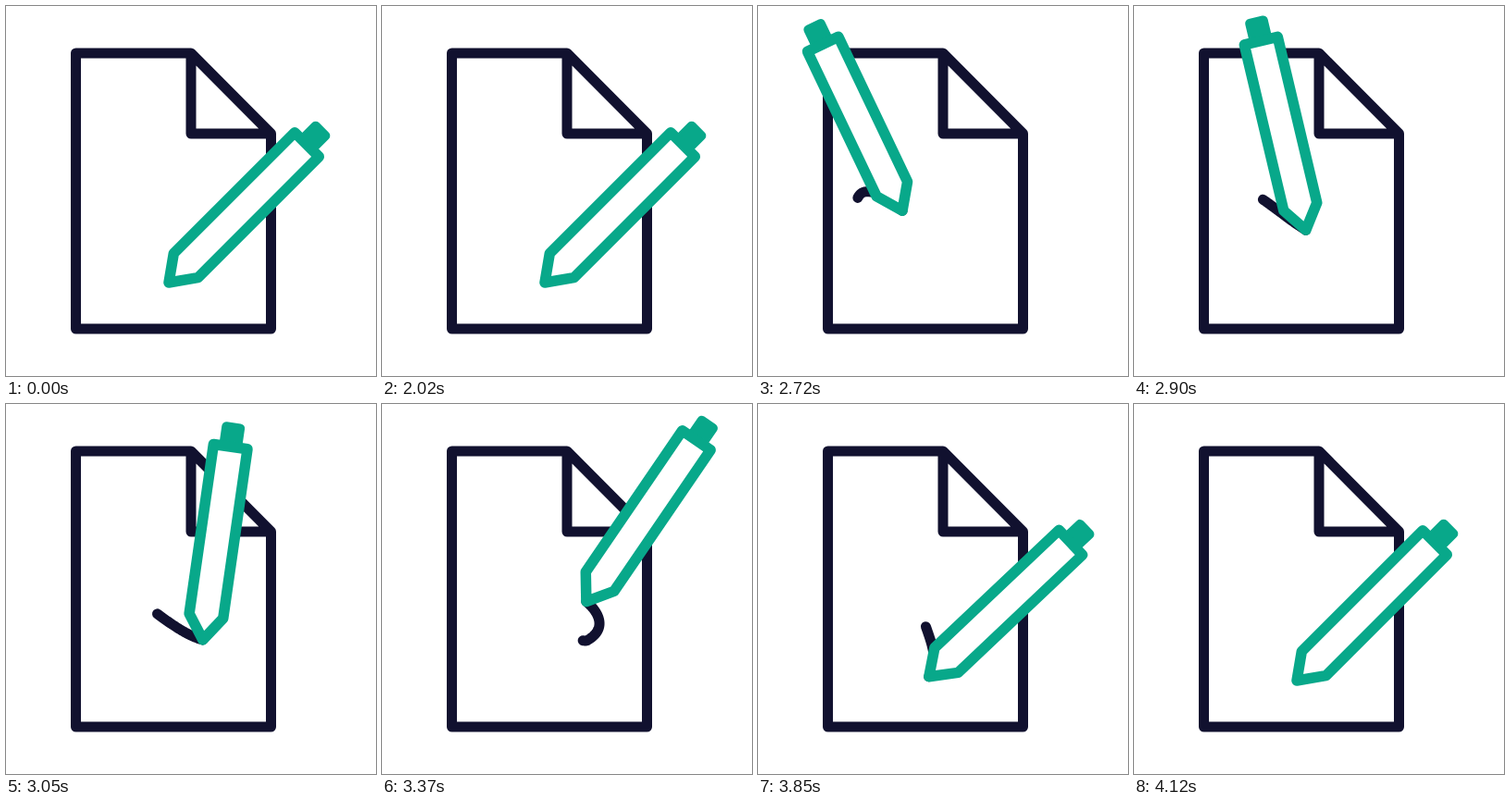
Recreate the animation shown at these times as an HTML page. Size 400x400 px, loop 4150 ms.

```html
<!DOCTYPE html>
<html lang="en">
<head>
<meta charset="utf-8">
<title>Signing a document</title>
<style>
  html, body { margin: 0; width: 100%; height: 100%; overflow: hidden; background: #fff; }
  svg { display: block; width: 100%; height: 100%; }
  path { stroke-width: 11; stroke-linecap: round; stroke-linejoin: round; fill: none; }
  .ink { stroke: #11112f; }
  #body { stroke: #08a88a; stroke-width: 11.5; fill: #fff; }
  #cap { fill: #08a88a; }
</style>
</head>
<body>
<svg viewBox="0 0 400 400">
  <path class="ink" d="M200 51H75.5V349H286.5V138H200V51L286.5 138"/>
  <path class="ink" id="trail"/>
  <g id="pen">
    <rect id="cap" x="-12.5" width="25" height="28" rx="5"/>
    <path id="body"/>
  </g>
</svg>
<script>
const LOOP = 4150, START = 2020, STEP = 25;
const INK_START = 2180, INK_LENGTH = 57, FADE_START = 3850, FADE_END = 4080;

const easeIn = power => s => s ** power;
const easeOut = power => s => 1 - (1 - s) ** power;
const linear = easeIn(1);

// Each stroke is a Bezier curve that continues from the end of the one before
const REST = { time: START, to: [176, 299], tilt: 45 };
const STROKES = [
  { time: 2550, via: [[114, 305], [76, 170]], to: [136, 207], move: easeIn(2.15),
    tilt: -28, swing: easeIn(1.34) },
  { time: 3095, via: [[158, 221], [196, 256]], to: [221, 256], move: easeIn(1.15),
    tilt: 18, swing: easeIn(2.5) },
  { time: 3600, via: [[260, 235], [210, 195]], to: [166, 190], move: linear,
    tilt: 48, swing: linear },
  { time: 4120, via: [[164, 215], [215, 290]], to: REST.to, move: easeOut(3.7),
    tilt: REST.tilt, swing: linear }
];

const trail = document.getElementById('trail');
const pen = document.getElementById('pen');
const cap = document.getElementById('cap');
const body = document.getElementById('body');

const clamp = (v, lo, hi) => Math.min(hi, Math.max(lo, v));

function bezier(a, b, c, d, u) {
  const v = 1 - u;
  return v * v * v * a + 3 * v * v * u * b + 3 * v * u * u * c + u * u * u * d;
}

function poseAt(t) {
  const i = STROKES.findIndex(stroke => t < stroke.time);
  if (t < START || i < 0) return [...REST.to, REST.tilt];
  const from = STROKES[i - 1] || REST, stroke = STROKES[i];
  const s = (t - from.time) / (stroke.time - from.time);
  const u = stroke.move(s);
  const [x, y] = [0, 1].map(k =>
    bezier(from.to[k], stroke.via[0][k], stroke.via[1][k], stroke.to[k], u));
  return [x, y, from.tilt + (stroke.tilt - from.tilt) * stroke.swing(s)];
}

// The pen looks shorter while it leans furthest to the left
const barrelAt = t => 185 - 28 * Math.exp(-(((t - 2550) / 180) ** 2));

// Walk back along the tip's path until the ink is used up
function inkPath(t) {
  let left = INK_LENGTH * clamp((FADE_END - t) / (FADE_END - FADE_START), 0, 1);
  if (t <= INK_START || left <= 0) return '';
  let [x, y] = poseAt(t);
  let d = `M${x.toFixed(2)} ${y.toFixed(2)}`;
  for (let s = t - 4; left > 0 && s >= INK_START; s -= 4) {
    const [nx, ny] = poseAt(s);
    const len = Math.hypot(nx - x, ny - y);
    const k = len > left ? left / len : 1;
    x += (nx - x) * k;
    y += (ny - y) * k;
    left -= len;
    d += `L${x.toFixed(2)} ${y.toFixed(2)}`;
  }
  return d;
}

function draw(time) {
  let t = time % LOOP;
  if (t >= START) t = START + STEP * Math.floor((t - START) / STEP);
  const [x, y, tilt] = poseAt(t);
  const top = -26 - barrelAt(t);
  pen.setAttribute('transform', `translate(${x} ${y}) rotate(${tilt})`);
  body.setAttribute('d', `M0 0L-18.5 -26V${top}H18.5V-26Z`);
  cap.setAttribute('y', top - 26);
  trail.setAttribute('d', inkPath(t));
}

const origin = performance.now();
function tick() {
  draw(performance.now() - origin);
  requestAnimationFrame(tick);
}
tick();
</script>
</body>
</html>
```
